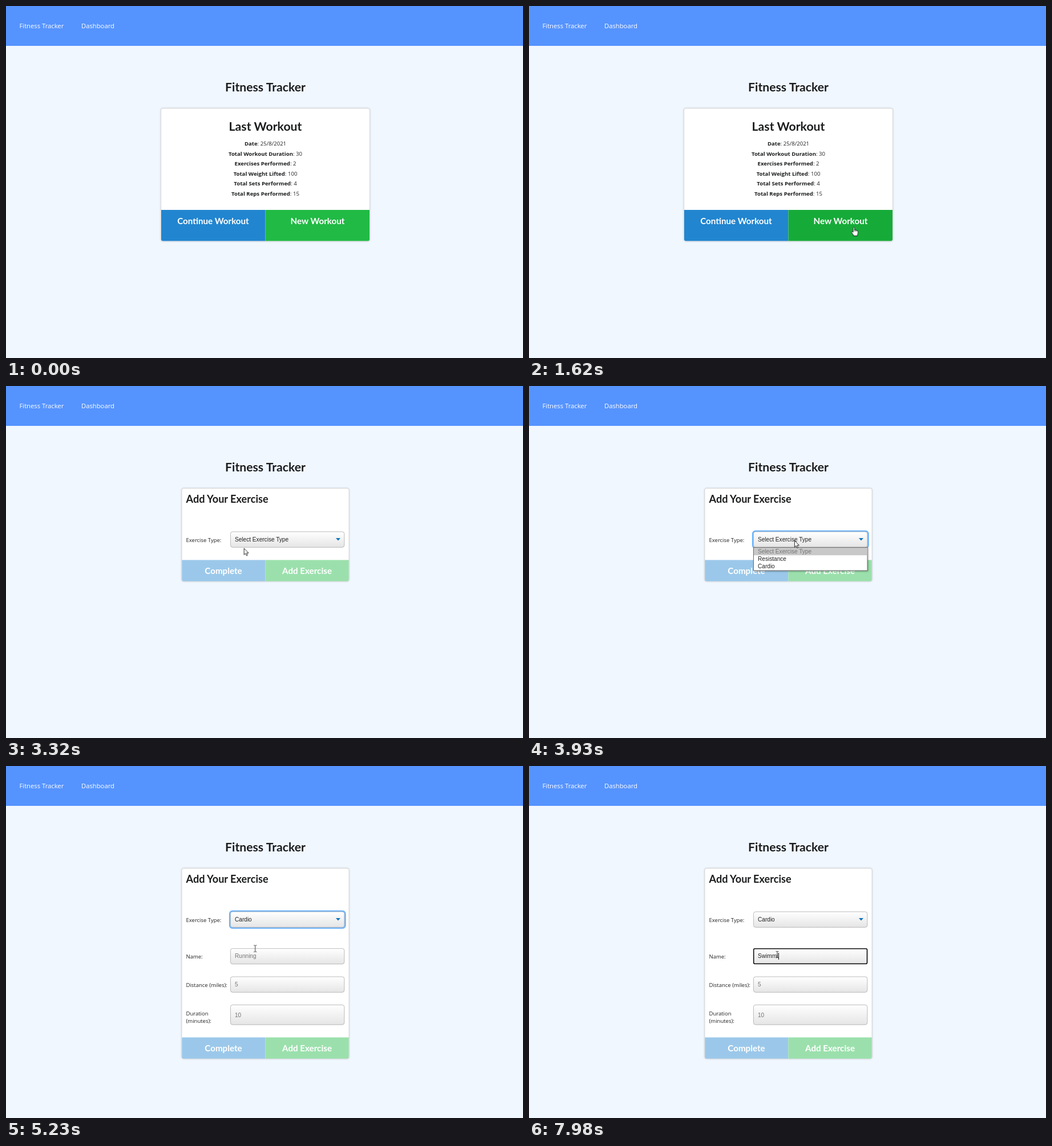
Animation, 906 px wide and 618 px high, one loop 8000 ms. Source, as an HTML page:

```html
<!DOCTYPE html>
<html lang="en">
<head>
<meta charset="utf-8">
<title>Fitness Tracker</title>
<style>
html, body { margin: 0; height: 100%; overflow: hidden; background: #f0f7ff; }
svg { display: block; width: 100vw; height: 100vh; }

.nav { font: 11.25px "Open Sans", sans-serif; fill: #fff; }
.head { font: 700 21.2px Lato, sans-serif; fill: #1b1c1d; }
.sub { font: 700 18.1px Lato, sans-serif; fill: #1b1c1d; }
.btn { font: 700 15.16px Lato, sans-serif; fill: #fff; }
.info, .label { font: 9.6px "Open Sans", sans-serif; fill: #222; }
.label { font-size: 9.5px; }
.info b, .info tspan { font-weight: 700; fill: #1b1c1d; }
.field { font: 10.1px "Liberation Sans", Arial, sans-serif; fill: #222; }
.hint { fill: #757575; }
.mid { text-anchor: middle; }
.card { fill: #fff; stroke: #d4d4d5; stroke-width: .8; filter: drop-shadow(0 .8px 1.4px #c9cacc); }
.box { fill: url(#shade); stroke: #aaa; stroke-width: .8; }
.blue { fill: #2185d0; }
.green { fill: #21ba45; }
.pale-blue { fill: #9bc8ea; }
.pale-green { fill: #9be0ac; }

/* every animation shares one 8 s clock */
[class*="a-"] { animation: 8s step-end infinite; }
.a-home { animation-name: home; }
.a-form { opacity: 0; animation-name: form; }
.a-hover { animation-name: hover; animation-timing-function: linear; }
.a-card { animation-name: grow; }
.a-foot { animation-name: drop; }
.a-fields, .a-chosen { opacity: 0; animation-name: fields; }
.a-unset { animation-name: unset-type; }
.a-ring { opacity: 0; animation-name: ring; }
.a-list { opacity: 0; animation-name: list; }
.a-row1 { animation-name: row1; }
.a-row2 { opacity: 0; animation-name: row2; }
.a-row3 { opacity: 0; animation-name: row3; }
.a-text2 { animation-name: text2; }
.a-text3 { animation-name: text3; }
.a-focus { opacity: 0; animation-name: focus; }
.a-hint { animation-name: hint; }
.a-caret { opacity: 0; animation-name: caret; }
.a-move { animation-name: move; animation-timing-function: linear; }
.a-arrow { opacity: 0; animation-name: arrow; }
.a-hand { opacity: 0; animation-name: hand; }
.a-beam { opacity: 0; animation-name: beam; }
.key { visibility: hidden; animation: 8s step-end infinite; }
.k1 { animation-name: key1; }
.k2 { animation-name: key2; }
.k3 { animation-name: key3; }
.k4 { animation-name: key4; }
.k5 { animation-name: key5; }
.k6 { animation-name: key6; }

@keyframes home { 0% { opacity: 1 } 31.375%, 100% { opacity: 0 } }
@keyframes form { 0% { opacity: 0 } 31.375%, 100% { opacity: 1 } }
@keyframes hover {
  0%, 18.25% { fill: #21ba45 }
  19.5%, 26.375% { fill: #16ab39 }
  27.5% { fill: #198f35 }
  28.875%, 100% { fill: #16ab39 }
}
@keyframes grow { 0% { height: 163px } 62.875%, 100% { height: 334px } }
@keyframes drop { 0% { transform: none } 62.875%, 100% { transform: translateY(171px) } }
@keyframes fields { 0% { opacity: 0 } 62.875%, 100% { opacity: 1 } }
@keyframes unset-type { 0% { opacity: 1 } 62.875%, 100% { opacity: 0 } }
@keyframes ring { 0% { opacity: 0 } 44.25% { opacity: 1 } 73%, 100% { opacity: 0 } }
@keyframes list { 0% { opacity: 0 } 44.25% { opacity: 1 } 62.875%, 100% { opacity: 0 } }
@keyframes row1 { 0% { opacity: 1 } 54.5%, 100% { opacity: 0 } }
@keyframes row2 { 0% { opacity: 0 } 54.5% { opacity: 1 } 57.5%, 100% { opacity: 0 } }
@keyframes row3 { 0% { opacity: 0 } 57.5%, 100% { opacity: 1 } }
@keyframes text2 { 0% { fill: #222 } 54.5% { fill: #fff } 57.5%, 100% { fill: #222 } }
@keyframes text3 { 0% { fill: #222 } 57.5%, 100% { fill: #fff } }
@keyframes focus { 0% { opacity: 0 } 73%, 100% { opacity: 1 } }
@keyframes hint { 0% { opacity: 1 } 86.5%, 100% { opacity: 0 } }
@keyframes key1 { 0% { visibility: hidden } 86.5%, 100% { visibility: visible } }
@keyframes key2 { 0% { visibility: hidden } 89.875%, 100% { visibility: visible } }
@keyframes key3 { 0% { visibility: hidden } 93.125%, 100% { visibility: visible } }
@keyframes key4 { 0% { visibility: hidden } 95.625%, 100% { visibility: visible } }
@keyframes key5 { 0% { visibility: hidden } 97.25%, 100% { visibility: visible } }
@keyframes key6 { 0% { visibility: hidden } 99.75%, 100% { visibility: visible } }
@keyframes caret {
  0% { opacity: 0; transform: none }
  73.875% { opacity: 1; transform: none }
  79.625% { opacity: 0; transform: none }
  85.625% { opacity: 1; transform: none }
  86.5% { opacity: 1; transform: translateX(7px) }
  89.875% { opacity: 1; transform: translateX(14px) }
  93.125% { opacity: 1; transform: translateX(16px) }
  95.625% { opacity: 1; transform: translateX(25px) }
  97.25% { opacity: 1; transform: translateX(33px) }
  99.75%, 100% { opacity: 1; transform: translateX(36px) }
}
@keyframes move {
  0%, 5.625% { transform: translate(831px, 585px) }
  15% { transform: translate(632px, 452px) }
  20.25% { transform: translate(569.5px, 388px) }
  23.875%, 35.5% { transform: translate(561.5px, 375px) }
  40% { transform: translate(390px, 292px) }
  44.25%, 49.125% { transform: translate(465px, 271px) }
  54.5% { transform: translate(452px, 297px) }
  58% { transform: translate(439.5px, 310.5px) }
  59.625%, 62.875% { transform: translate(438px, 313px) }
  68.875%, 100% { transform: translate(435px, 331px) }
}
@keyframes arrow {
  0% { opacity: 0 } 5.625% { opacity: 1 } 18.25% { opacity: 0 }
  35.5% { opacity: 1 } 65.25%, 100% { opacity: 0 }
}
@keyframes hand { 0% { opacity: 0 } 18.25% { opacity: 1 } 35.5%, 100% { opacity: 0 } }
@keyframes beam { 0% { opacity: 0 } 65.25%, 100% { opacity: 1 } }
</style>
</head>
<body>
<svg viewBox="0 0 906 618">
  <defs>
    <linearGradient id="shade" x2="0" y2="1">
      <stop stop-color="#fff"/>
      <stop offset="1" stop-color="#e5e5e5"/>
    </linearGradient>
  </defs>

  <rect width="906" height="618" fill="#f0f7ff"/>
  <rect width="906" height="70" fill="#5593ff"/>
  <text class="nav" x="23.5" y="39">Fitness Tracker</text>
  <text class="nav" x="132" y="39">Dashboard</text>
  <text class="head mid" x="454.5" y="149.7">Fitness Tracker</text>

  <g class="a-home">
    <rect class="card" x="271.6" y="179.8" width="365.8" height="233" rx="3.2"/>
    <text class="head mid" x="454.5" y="219">Last Workout</text>
    <g class="info mid">
      <text x="454.5" y="245.4"><tspan>Date</tspan>: 25/8/2021</text>
      <text x="454.5" y="262.9"><tspan>Total Workout Duration</tspan>: 30</text>
      <text x="454.5" y="280.4"><tspan>Exercises Performed</tspan>: 2</text>
      <text x="454.5" y="297.9"><tspan>Total Weight Lifted</tspan>: 100</text>
      <text x="454.5" y="315.4"><tspan>Total Sets Performed</tspan>: 4</text>
      <text x="454.5" y="332.9"><tspan>Total Reps Performed</tspan>: 15</text>
    </g>
    <path class="blue" d="M272 358H454.5V412.5H275a3 3 0 0 1-3-3Z"/>
    <path class="green a-hover" d="M454.5 358H637V409.5a3 3 0 0 1-3 3H454.5Z"/>
    <text class="btn mid" x="363" y="382.5">Continue Workout</text>
    <text class="btn mid" x="546" y="382.5">New Workout</text>
  </g>

  <g class="a-form">
    <rect class="card a-card" x="308" y="179.8" width="293" height="163" rx="3.2"/>
    <text class="sub" x="315.5" y="204.5">Add Your Exercise</text>

    <g class="a-foot">
      <path class="pale-blue" d="M308.3 305.5H454.5V342.8H311.3a3 3 0 0 1-3-3Z"/>
      <path class="pale-green" d="M454.5 305.5H600.7V339.8a3 3 0 0 1-3 3H454.5Z"/>
      <text class="btn mid" x="381" y="330.3">Complete</text>
      <text class="btn mid" x="527.5" y="330.3">Add Exercise</text>
    </g>

    <text class="label" x="315.5" y="274">Exercise Type:</text>
    <rect class="a-ring" x="392.2" y="254.8" width="202.2" height="29.6" rx="4.5" fill="none" stroke="#6cb3fb" stroke-width="2.6"/>
    <rect class="box" x="393.4" y="255.9" width="199.5" height="27.3" rx="3.8"/>
    <path d="M578 267H586L582 271.6Z" fill="#0f75bc"/>
    <text class="field a-unset" x="401" y="273">Select Exercise Type</text>
    <text class="field a-chosen" x="401" y="273">Cardio</text>

    <g class="a-fields">
      <text class="label" x="315.5" y="338.3">Name:</text>
      <rect class="box" x="393.4" y="320.4" width="199.5" height="27.3" rx="3.8"/>
      <rect class="a-focus" x="393.7" y="320.7" width="198.8" height="26.6" rx="2" fill="none" stroke="#101010" stroke-width="1.6"/>
      <text class="field hint a-hint" x="401" y="337.4">Running</text>
      <text class="field" x="401" y="337.4"><tspan class="key k1">S</tspan><tspan class="key k2">w</tspan><tspan class="key k3">i</tspan><tspan class="key k4">m</tspan><tspan class="key k5">m</tspan><tspan class="key k6">i</tspan></text>
      <rect class="a-caret" x="401" y="328" width="1" height="12" fill="#111"/>

      <text class="label" x="315.5" y="388">Distance (miles):</text>
      <rect class="box" x="393.4" y="370" width="199.5" height="27.3" rx="3.8"/>
      <text class="field hint" x="401" y="387">5</text>

      <text class="label" x="315.5" y="437.6">Duration</text>
      <text class="label" x="315.5" y="451.4">(minutes):</text>
      <rect class="box" x="393.4" y="419.4" width="199.5" height="34.8" rx="3.8"/>
      <text class="field hint" x="401" y="440.5">10</text>
    </g>

    <g class="a-list">
      <rect x="393.5" y="283.5" width="199.5" height="40.5" fill="#fff" stroke="#707070" style="filter:drop-shadow(1px 1px 1.5px #0005)"/>
      <rect class="a-row1" x="394" y="284" width="198.5" height="13.2" fill="#c8c8c8"/>
      <rect class="a-row2" x="394" y="297.2" width="198.5" height="13.1" fill="#1e90ff"/>
      <rect class="a-row3" x="394" y="310.3" width="198.5" height="13.2" fill="#1e90ff"/>
      <text class="field hint" x="401" y="293.7">Select Exercise Type</text>
      <text class="field a-text2" x="401" y="306.8">Resistance</text>
      <text class="field a-text3" x="401" y="320">Cardio</text>
    </g>
  </g>

  <g class="a-move" fill="#fff" stroke="#111" stroke-width=".9" stroke-linejoin="round">
    <path class="a-arrow" d="M.4 .4V11.8L3 9.4 4.8 13.4 6.6 12.6 4.9 8.7H8.4Z"/>
    <g class="a-hand">
      <path d="M-1.5 1.5Q-1.5 .4 -.3 .4T.9 1.5V5.2Q2.5 4.3 3 5.6Q4.5 4.8 5 6.1Q7 5.6 7 7.5V10.5Q7 12.3 6 13.5V15.6H-1V14L-4.2 9.6Q-4.8 8.4 -3.8 8Q-3 7.8 -1.5 9.3Z"/>
      <path d="M.9 5.2V8M3 5.6V8M5 6.1V8" fill="none" stroke-width=".7"/>
    </g>
    <path class="a-beam" fill="none" stroke="#222" d="M-2.5 -5.8Q0 -5.8 0 -4.6V4.6Q0 5.8 -2.5 5.8M2.5 -5.8Q0 -5.8 0 -4.6M2.5 5.8Q0 5.8 0 4.6"/>
  </g>
</svg>
</body>
</html>
```
